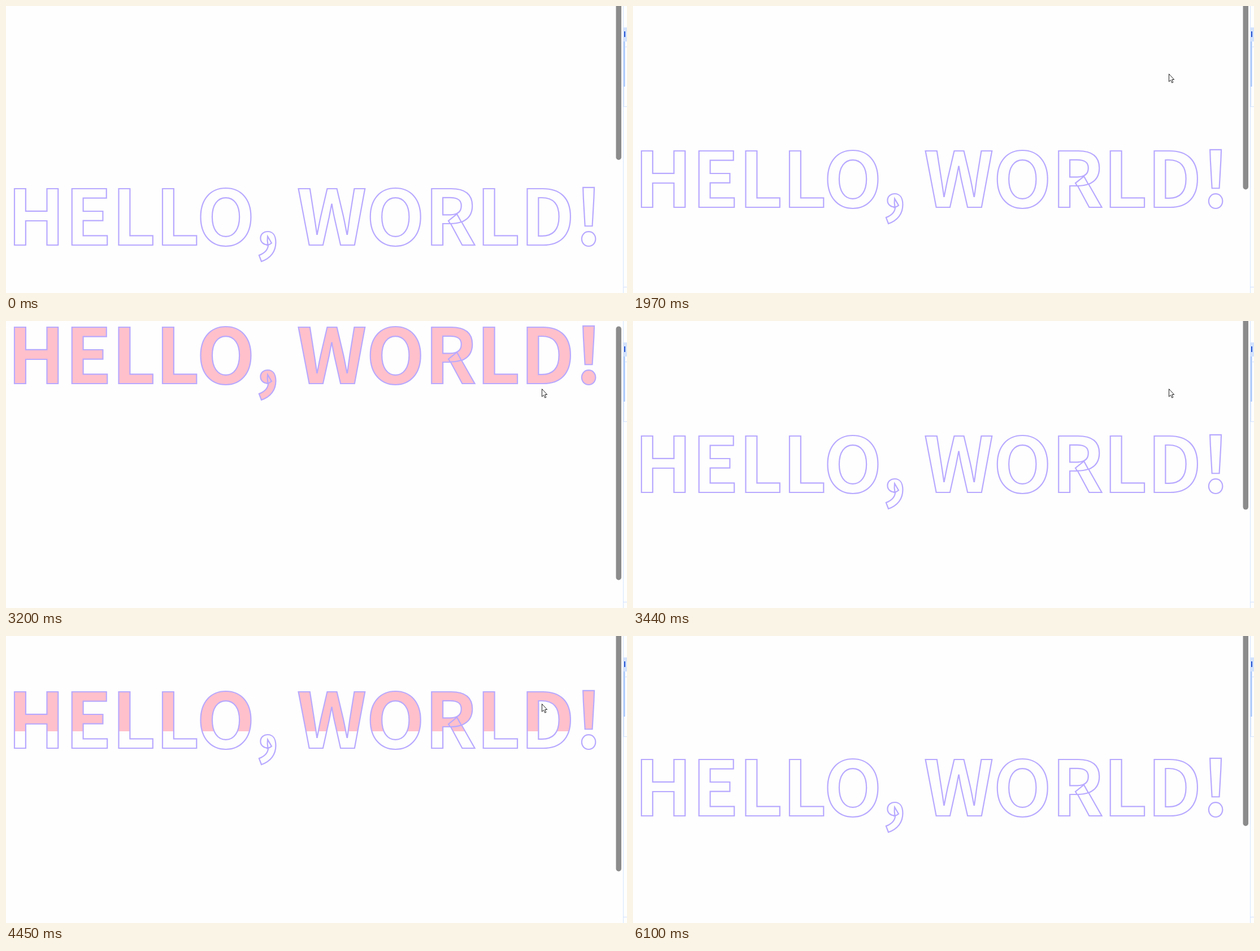
An HTML page with a canvas that plays this animation: 1099 px wide and 509 px high, repeating every 6510 ms.

```html
<!DOCTYPE html>
<html lang="en">
<head>
<meta charset="utf-8">
<title>Hello, world!</title>
<style>
html, body { margin: 0; width: 100%; height: 100%; overflow: hidden; background: #fefefe; }
canvas { display: block; }
</style>
</head>
<body>
<canvas id="stage" width="1099" height="509"></canvas>
<script>
const ctx = document.getElementById('stage').getContext('2d');
const LOOP = 6510, WIDTH = 1099, HEIGHT = 509;
const TEXT = 'HELLO, WORLD!';
const LEFT = 13.3, SPAN = 1030.7, REST = 424.3;
const PINK_END = 169;

const setFont = size => {
  ctx.font = `700 ${size}px "Noto Sans CJK SC", "Noto Sans CJK JP", "Noto Sans CJK", "Noto Sans", sans-serif`;
  ctx.fontKerning = 'normal';
};
// One headline size for the line, aligned by its ink
setFont(1000);
const ink = ctx.measureText(TEXT);
const fontSize = 1000 * SPAN / (ink.actualBoundingBoxLeft + ink.actualBoundingBoxRight);
const textX = LEFT + ink.actualBoundingBoxLeft * fontSize / 1000;

// Keys are [time, value]
const baseline = [
  [0, REST], [1850, REST], [2170, 212.8], [2450, 212.8], [2625, 104.5],
  [3160, 104.5], [3640, REST], [3940, REST], [4400, 212.8], [4405, 212.8],
  [4610, 104.5], [4910, 104.5], [5180, 319.3]
];
const mouseX = [[1450, 923], [1850, 948], [5340, 948], [6020, 610]];
const mouseY = [[1450, -12], [1850, 120], [5340, 120], [6020, -14]];

function track(keys, t) {
  const i = keys.findIndex(k => k[0] > t);
  if (i < 0) return keys[keys.length - 1][1];
  if (i === 0) return keys[0][1];
  const [t0, a] = keys[i - 1], [t1, b] = keys[i];
  const p = (t - t0) / (t1 - t0);
  return a + (b - a) * p * p * (3 - 2 * p);
}

// The picture advances in 40 ms steps within each phase
const phases = [0, 1450, 2460, 3200, 3970, 4940, 5380];
function step(t) {
  const start = phases.filter(p => p <= t).pop();
  return start + Math.floor((t - start) / 40) * 40;
}

function rect(color, x, y, w, h) {
  ctx.fillStyle = color;
  ctx.fillRect(x, y, w, h);
}

function drawPanel() {
  rect('#d3e3fd', 1092, 0, 1, HEIGHT);
  rect('#d3e3fd', 1093, 38, 6, 25);
  rect('#1f4fd0', 1094, 45, 2, 10);
  rect('#a8c7fa', 1093, 63, 2.5, 80);
  rect('#d3e3fd', 1095, 72, 4, 1);
  rect('#d3e3fd', 1093, 143, 1, 35);
  rect('#d3e3fd', 1093, 178, 6, 1);
  rect('#d3e3fd', 1093, 498, 6, 1);
}

// Crossing contours inside the comma and the R
const crossings = new Path2D(
  'M463.5 423.5Q462 416 463 408.5L470 420.5Q466 424 461 424.5' +
  'M786 386L783 381L798 369L806 383.5M786 386Q797 386 806 383');

function drawText(y) {
  setFont(fontSize);
  ctx.save();
  ctx.beginPath();
  ctx.rect(0, 0, WIDTH, PINK_END);
  ctx.clip();
  ctx.fillStyle = '#ffc0cb';
  ctx.fillText(TEXT, textX, y);
  ctx.restore();
  ctx.strokeStyle = '#b8a9ff';
  ctx.lineWidth = 2.2;
  ctx.lineJoin = 'miter';
  ctx.strokeText(TEXT, textX, y);
  ctx.save();
  ctx.translate(0, y - REST);
  ctx.stroke(crossings);
  ctx.restore();
}

function drawScrollbar(y) {
  const bottom = 273 + (REST - y) * 0.609;
  ctx.fillStyle = '#8b8b8b';
  ctx.beginPath();
  ctx.roundRect(1079.5, bottom - 450, 9.5, 450, 4.75);
  ctx.fill();
}

const arrow = new Path2D('M.5 .5V14.2L3.6 11.3L5.7 16.2L7.8 15.3L5.8 10.5H9.7Z');

function drawMouse(t) {
  if (t < 1450 || t >= 6100) return;
  ctx.save();
  ctx.translate(track(mouseX, t), track(mouseY, t));
  ctx.fillStyle = '#fff';
  ctx.strokeStyle = '#222';
  ctx.lineWidth = 1;
  ctx.fill(arrow);
  ctx.stroke(arrow);
  ctx.restore();
}

function draw() {
  const t = step(performance.now() % LOOP);
  rect('#fefefe', 0, 0, WIDTH, HEIGHT);
  drawPanel();
  drawText(track(baseline, t));
  drawScrollbar(track(baseline, t + 20)); // the thumb runs slightly ahead
  drawMouse(t);
  requestAnimationFrame(draw);
}
draw();
</script>
</body>
</html>
```
